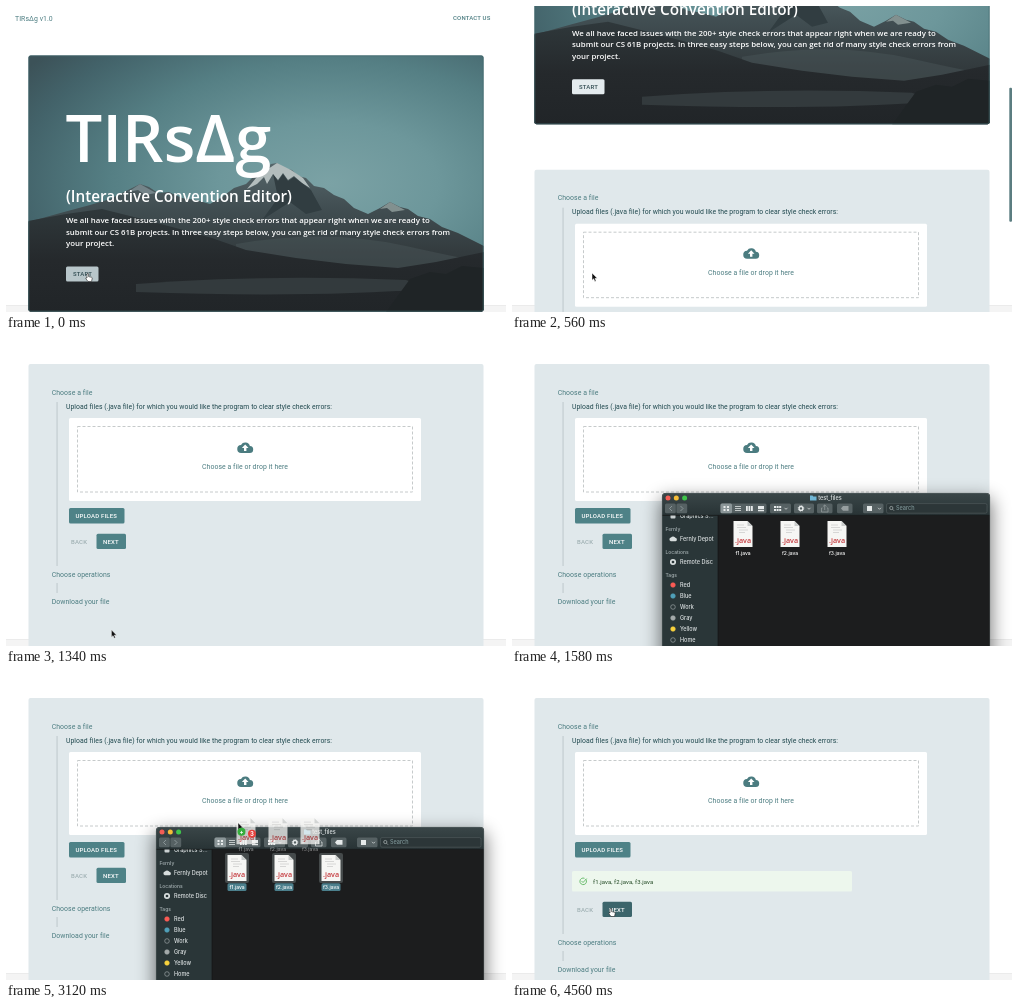
An HTML page for the animation above (4580 ms loop, 500 by 306 pixels).

```html
<!DOCTYPE html>
<html lang="en">
<head>
<meta charset="utf-8">
<title>Convention editor demo</title>
<style>
html, body { margin: 0; width: 100%; height: 100%; overflow: hidden; background: #fff; }
svg { display: block; width: 500px; height: 306px; }
text { font: 400 6.9px Roboto, Arial, sans-serif; letter-spacing: .06px; fill: #4b7c80; white-space: pre; }
.hero text { font-family: "Open Sans", "Noto Sans", sans-serif; font-weight: 600; letter-spacing: 0; fill: #fff; }
.hero .title { font-size: 65px; }
.hero .sub { font-size: 15.3px; }
.hero .body { font-size: 7.87px; }
.hero .btn, .btn { font: 500 6px Roboto, Arial, sans-serif; letter-spacing: .17px; }
.hero .btn { fill: #2f4a50; }
.light { fill: #fff; }
.finder text { font: 500 5.5px Inter, Roboto, sans-serif; letter-spacing: 0; fill: #dfe4e5; }
.finder .head { font-size: 4.9px; font-weight: 600; fill: #98a3a5; }
.finder .label, .ghosts .label { font: 500 5px Inter, sans-serif; letter-spacing: 0; fill: #fff; text-anchor: middle; }
.ext { font: 600 7.2px "Open Sans", sans-serif; letter-spacing: 0; fill: #c4393d; text-anchor: middle; }
.badge { font: 700 6px Inter, sans-serif; fill: #fff; text-anchor: middle; }
</style>
</head>
<body>
<svg viewBox="0 0 500 306">
  <defs>
    <radialGradient id="sky" cx=".66" cy=".5" r=".8">
      <stop offset="0" stop-color="#7ba2a5"/><stop offset=".3" stop-color="#6d979b"/>
      <stop offset=".6" stop-color="#557f84"/><stop offset=".85" stop-color="#43636a"/><stop offset="1" stop-color="#3c5258"/>
    </radialGradient>
    <linearGradient id="far" x1="0" y1="0" x2="0" y2="1">
      <stop offset="0" stop-color="#56666a"/><stop offset=".3" stop-color="#414e52"/>
      <stop offset=".6" stop-color="#333b3e"/><stop offset="1" stop-color="#262c2e"/>
    </linearGradient>
    <linearGradient id="near" x1="0" y1="0" x2="0" y2="1">
      <stop offset="0" stop-color="#2f383b"/><stop offset=".5" stop-color="#25292c"/><stop offset="1" stop-color="#212528"/>
    </linearGradient>
    <linearGradient id="bar" x1="0" y1="0" x2="0" y2="1">
      <stop offset="0" stop-color="#3a4648"/><stop offset="1" stop-color="#283335"/>
    </linearGradient>
    <clipPath id="card"><rect x="22.500" y="49.500" width="455" height="256" rx="2"/></clipPath>
    <clipPath id="side"><rect x="150" y="175.500" width="56" height="131"/></clipPath>
    <filter id="blur" x="-30%" y="-30%" width="160%" height="160%"><feGaussianBlur stdDeviation="9"/></filter>
    <g id="doc">
      <path d="M-9.500 -13H4.500L9.500 -8V13H-9.500Z" fill="#f6f6f4"/>
      <path d="M4.500 -13V-8H9.500Z" fill="#c9cccb"/>
      <path d="M-6 -9H1M-6 -6.500H3M-4 -4H5M-4 -1.500H2" stroke="#cfcfcd" stroke-width=".8"/>
      <text class="ext" y="9">.java</text>
    </g>
  </defs>

  <rect y="299" width="500" height="7" fill="#f4f4f4"/>
  <path d="M0 299.500H500" stroke="#e9e9e9" stroke-width=".7"/>

  <g id="page">
    <text x="9" y="14.500">TIRsΔg v1.0</text>
    <text x="447" y="14.300" class="btn">CONTACT US</text>

    <g class="hero">
      <g clip-path="url(#card)">
        <rect x="22" y="49" width="456" height="257" fill="url(#sky)"/>
        <path d="M22 216L58 206 84 199 104 193 120 185 134 178 143 181 152 187 163 186 176 192 190 194 204 198 216 191 228 182 240 178 250 168 258 164 265 158 271 157 278 162 286 164 292 170 300 172 308 180 318 182 328 189 338 193 348 202 362 208 374 202 384 196 394 201 402 203 412 210 424 213 436 221 452 227 478 240V306H22Z" fill="url(#far)"/>
        <path d="M271 157L262 163 250 172 241 183 251 178 258 171 261 178 267 168 272 174 277 167 282 174 288 170 296 177 304 182 297 172 285 164Z" fill="#b3bdbd"/>
        <path d="M384 196L374 203 381 202 386 206 399 204Z" fill="#82908f"/>
        <path d="M134 178L122 186 132 184 139 189 150 187Z" fill="#748489"/>
        <path d="M267 168L272 192 256 214 284 196 300 208 316 204 305 184 288 171 282 175 277 168 272 175Z" fill="#313d41"/>
        <path d="M230 238Q320 222 400 240T478 254V275H230Z" fill="#4e5b5d" opacity=".4"/>
        <path d="M22 215L60 208 96 203 132 212 170 222 206 232 240 244 290 252 340 258 392 262 430 256 478 246V306H22Z" fill="url(#near)"/>
        <path d="M130 278Q260 268 400 274L424 283Q300 292 130 286Z" fill="#394143" opacity=".75"/>
        <path d="M404 273L424 266 440 268 456 260 478 262V306H380Z" fill="#1f2426"/>
      </g>
      <rect x="22.800" y="49.800" width="454.400" height="255.400" rx="2" fill="none" stroke="#3f666b" stroke-width=".7"/>
      <text class="title" x="59.500" y="156">TIRsΔg</text>
      <text class="sub" x="60" y="196">(Interactive Convention Editor)</text>
      <text class="body" x="60" y="217">We all have faced issues with the 200+ style check errors that appear right when we are ready to</text>
      <text class="body" x="60" y="228.700">submit our CS 61B projects. In three easy steps below, you can get rid of many style check errors from</text>
      <text class="body" x="60" y="240.400">your project.</text>
      <rect id="start" x="60" y="260.500" width="32.500" height="15" rx="1.500"/>
      <text class="btn" x="67" y="270.200">START</text>
    </g>

    <g transform="translate(0 327)">
      <rect x="22.500" y="24" width="455" height="320" rx="2" fill="#e0e8eb"/>
      <text x="45.700" y="54.600">Choose a file</text>
      <rect id="line" x="50.600" y="62" width=".9" fill="#b9c4c7"/>
      <text x="60" y="68.500" style="font-size:6.85px;letter-spacing:.04px;fill:#20494f">Upload files (.java file) for which you would like the program to clear style check errors:</text>
      <rect x="63" y="78" width="352" height="83" rx="1.500" fill="#fff"/>
      <rect x="71.500" y="86.500" width="335" height="65.500" fill="none" stroke="#c6cacb" stroke-dasharray="3 2"/>
      <path d="M235.500 113A4 4 0 0 1 235 105 4.900 4.900 0 0 1 243.900 106 3.500 3.500 0 0 1 243.500 113Z" fill="#4b7c80"/>
      <path d="M239.200 104.500L235.900 108H238V111H240.400V108H242.500Z" fill="#fff"/>
      <text x="196" y="129">Choose a file or drop it here</text>
      <rect x="63" y="168" width="55.500" height="15.500" rx="1.500" fill="#4e8287"/>
      <text class="btn light" x="69.500" y="177.900">UPLOAD FILES</text>
      <g id="alert">
        <rect x="60" y="197" width="280" height="20.500" rx="1.500" fill="#edf7ed"/>
        <path d="M73.800 205.300A3.300 3.300 0 1 1 72.500 204.300M69.500 207L71 208.500 74.700 204.600" fill="none" stroke="#4caf50" stroke-width=".8"/>
        <text x="81" y="209.600" style="font-size:6px;fill:#1e4620">f1.java, f2.java, f3.java</text>
      </g>
      <g id="low">
        <text class="btn" x="65" y="203.700" style="fill:#9eafb2">BACK</text>
        <rect id="next" x="90.500" y="193.700" width="29.500" height="15.300" rx="1.500"/>
        <text class="btn light" x="97" y="203.700">NEXT</text>
        <text x="45.700" y="236.600">Choose operations</text>
        <rect x="50.600" y="243" width=".9" height="10" fill="#b9c4c7"/>
        <text x="45.700" y="264">Download your file</text>
      </g>
    </g>
  </g>
  <rect id="thumb" x="497.300" width="2.700" height="134" rx="1" fill="#5b7d80"/>

  <g id="finder" class="finder">
    <rect x="148" y="158" width="332" height="170" rx="6" fill="#000" opacity=".5" filter="url(#blur)"/>
    <rect x="150" y="153" width="328" height="160" rx="4" fill="#1c1d1e"/>
    <path d="M150 175.500V157Q150 153 154 153H474Q478 153 478 157V175.500Z" fill="url(#bar)"/>
    <rect x="150" y="175.500" width="56" height="135" fill="#2a3638"/>
    <path d="M150 175.300H478M206 175.500V306" stroke="#111" stroke-width=".6"/>
    <path d="M150.200 306V157Q150.200 153.200 154 153.200H474Q477.800 153.200 477.800 157V306" fill="none" stroke="#6d7678" stroke-width=".4"/>
    <circle cx="156" cy="158" r="2.500" fill="#f45d55"/><circle cx="164.300" cy="158" r="2.500" fill="#f5bd37"/><circle cx="172.600" cy="158" r="2.500" fill="#3fc54b"/>
    <path d="M298 155.500H300.500L301.300 156.500H304.500V160.500H298Z" fill="#6fb6d6"/>
    <text x="306.200" y="160">test_files</text>
    <g id="tools" fill="#566163"></g>
    <path d="M160 166L157.500 168.500 160 171M168.500 166L171 168.500 168.500 171" fill="none" stroke="#98a3a5" stroke-width=".8"/>
    <rect x="208.500" y="163.600" width="11.500" height="9.600" rx="1.500" fill="#8b9698"/>
    <g fill="#e6eaea">
      <path d="M211.500 166h2v2h-2zm3.500 0h2v2h-2zm-3.500 3h2v2h-2zm3.500 0h2v2h-2zM223 166h6v.8h-6zm0 2h6v.8h-6zm0 2h6v.8h-6zM234 166h1.800v5H234zm2.500 0h1.800v5h-1.800zm2.500 0h1.800v5H239zM246 166h6v3.300h-6zm0 4h6v1.200h-6z"/>
      <path d="M262 166h2v2h-2zm2.600 0h2v2h-2zm2.600 0h2v2h-2zm-5.200 3h2v2h-2zm2.600 0h2v2h-2zm2.600 0h2v2h-2z"/>
    </g>
    <path d="M272.500 167.800L274 169.300 275.500 167.800M295.500 167.800L297 169.300 298.500 167.800M366 167.800L367.500 169.300 369 167.800" fill="none" stroke="#d3d8d9" stroke-width=".8"/>
    <circle cx="289" cy="168.400" r="1.900" fill="none" stroke="#e6eaea" stroke-width="1.400"/>
    <circle cx="289" cy="168.400" r="2.800" fill="none" stroke="#e6eaea" stroke-width=".8" stroke-dasharray="1.100 1.100"/>
    <g id="active">
      <path d="M310.500 168H309.500V172H316V168H315M312.700 170V165L311 166.500M312.700 165L314.500 166.500" fill="none" stroke="#e6eaea" stroke-width=".7"/>
      <path d="M329 168.400L331 166H336.500V170.800H331Z" fill="#e6eaea"/>
    </g>
    <rect x="355" y="166" width="5" height="5" fill="#e6eaea"/>
    <rect x="374.500" y="163.600" width="100.500" height="9.600" rx="1.500" fill="#2c3638" stroke="#5a6466" stroke-width=".5"/>
    <circle cx="379.300" cy="168" r="1.600" fill="none" stroke="#aeb6b7" stroke-width=".7"/><path d="M380.500 169.200L382 170.700" stroke="#aeb6b7" stroke-width=".7"/>
    <text x="384" y="170.400" style="fill:#7f9799">Search</text>

    <g clip-path="url(#side)">
      <rect x="158.500" y="174" width="5" height="4.500" rx="1" fill="#c9d0d1"/>
      <text x="168" y="178.200">Graphics S...</text>
      <text class="head" x="153.500" y="190.800">Fernly</text>
      <path d="M158.800 201.300A1.900 1.900 0 0 1 159 197.600 2.500 2.500 0 0 1 163.400 197.800 1.800 1.800 0 0 1 163.600 201.300Z" fill="#d7dddd"/>
      <text x="168" y="201">Fernly Depot</text>
      <text class="head" x="153.500" y="213.800">Locations</text>
      <circle cx="161" cy="222" r="2.200" fill="none" stroke="#d7dddd" stroke-width="1.700"/>
      <text x="168" y="224">Remote Disc</text>
      <text class="head" x="153.500" y="237.300">Tags</text>
      <g id="tags"></g>
    </g>
    <g id="files"></g>
    <rect id="band" fill="#fff" fill-opacity=".13" stroke="#b5baba" stroke-width=".5"/>
  </g>

  <g id="ghosts" class="ghosts"></g>
  <g id="cursor">
    <path id="arrow" d="M0 0V7.300L1.700 5.800 2.800 8.400 4.100 7.900 3 5.300H5.300Z" fill="#111" stroke="#fff" stroke-width=".5"/>
    <path id="hand" d="M1 .8Q1.900 0 2.600 .8V3.600L5.600 4.300Q6.400 4.600 6.200 5.600L5.500 8.500H2L-.3 5.400Q-.3 4.400 1 5Z" fill="#fff" stroke="#222" stroke-width=".6"/>
    <g id="badges">
      <circle cx="3.500" cy="9" r="4" fill="#35ad3c"/><text class="badge" x="3.500" y="11.200">+</text>
      <circle cx="14" cy="11" r="4" fill="#e5403c"/><text class="badge" x="14" y="13.200">3</text>
    </g>
  </g>
</svg>
<script>
const LOOP = 4580;
const SCROLL = 327;
const $ = id => document.getElementById(id);
const set = (el, attrs) => { for (const k in attrs) el.setAttribute(k, attrs[k]); };
const show = (el, on) => { el.style.display = on ? '' : 'none'; };
const ramp = (t, a, b) => Math.min(1, Math.max(0, (t - a) / (b - a)));
const ease = p => p * p * (3 - 2 * p);
const smooth = (t, a, b) => ease(ramp(t, a, b));
const mix = (a, b, p) => a + (b - a) * p;
const blend = (a, b, p) => `rgb(${a.map((v, i) => Math.round(mix(v, b[i], p)))})`;

// Toolbar buttons: x, width
$('tools').innerHTML = [[153, 10.8], [164.4, 10.8], [208.5, 46], [258, 21], [282, 20], [305, 15.5], [325, 15.5], [351, 20.5]]
  .map(([x, w]) => `<rect x="${x}" y="163.600" width="${w}" height="9.600" rx="1.500"/>`).join('');

$('tags').innerHTML = [['Red', '#fb5b55'], ['Blue', '#4f9fb8'], ['Work'], ['Gray', '#a3a9aa'], ['Yellow', '#f7d13d'], ['Home']]
  .map(([name, fill], i) => {
    const y = 245 + i * 11;
    return `<circle cx="161" cy="${y}" r="2.300" fill="${fill || 'none'}" stroke="${fill || '#aab3b4'}" stroke-width=".6"/>` +
      `<text x="168" y="${y + 2}">${name}</text>`;
  }).join('');

const fileX = [231, 278, 325];
$('files').innerHTML = fileX.map((x, i) => `<g transform="translate(${x} 194)">
  <g class="pick"><rect x="-12" y="-15" width="24" height="30" rx="2" fill="#454a4b"/>
  <rect x="-9.500" y="15.300" width="19" height="7.800" rx="1.500" fill="#4b7f8c"/></g>
  <use href="#doc"/><text class="label" y="21.200">f${i + 1}.java</text></g>`).join('');
$('ghosts').innerHTML = fileX.map((x, i) => `<g opacity=".75"><use href="#doc"/>
  <text class="label" y="20" opacity=".6">f${i + 1}.java</text></g>`).join('');
const picks = [...document.querySelectorAll('.pick')];
const ghosts = [...$('ghosts').children];

// Pointer stops: time, x, y
const path = [
  [0, 80, 267], [1240, 80, 267], [1440, 130, 312], [1640, 300, 312],
  [2190, 376, 203], [2320, 376, 203], [2720, 216, 181], [2880, 223, 186],
  [3380, 242, 107], [3600, 242, 107], [3820, 256, 110], [4200, 256, 110], [4550, 97, 234]
];

function pointer(t) {
  const i = path.findIndex(p => p[0] > t);
  if (i < 0) return path[path.length - 1].slice(1);
  const a = path[i - 1], b = path[i], p = smooth(t, a[0], b[0]);
  return [mix(a[1], b[1], p), mix(a[2], b[2], p)];
}

function draw(t) {
  const [x, y] = pointer(t);
  const top = SCROLL * smooth(t, 240, 825);
  set($('page'), { transform: `translate(0 ${-top})` });
  set($('thumb'), { y: top * 0.437, opacity: t < 240 ? 0 : 1 - 0.8 * ramp(t, 960, 1100) });
  show($('thumb'), t < 1100);
  set($('start'), { fill: blend([184, 198, 202], [228, 235, 238], ramp(t, 60, 300)) });

  const done = t >= 3600;
  show($('alert'), done);
  set($('low'), { transform: `translate(0 ${done ? 34 : 0})` });
  set($('line'), { height: done ? 198 : 164 });
  set($('next'), { fill: blend([78, 130, 135], [60, 101, 107], ramp(t, 4460, 4550)) });

  const open = ramp(t, 1420, 1500) * (1 - ramp(t, 3640, 3800));
  show($('finder'), open > 0);
  set($('finder'), { opacity: open });
  const picking = t >= 2320 && t < 2740;
  show($('band'), picking);
  if (picking) set($('band'), { x, y, width: Math.max(0, 376 - x), height: Math.max(0, 203 - y) });
  picks.forEach((el, i) => show(el, t >= 2720 || (t >= 2320 && x < fileX[i] + 10)));
  set($('active'), { opacity: t >= 2500 ? 1 : 0.45 });

  const drag = t >= 2880 && t < 3600;
  show($('ghosts'), drag);
  show($('badges'), t >= 3000 && t < 3600);
  const gap = mix(47, 32, smooth(t, 2880, 3090));
  ghosts.forEach((el, i) => set(el, { transform: `translate(${x + 8 + i * gap} ${y + 8.5})` }));

  const hand = t < 300 || t >= 4480;
  set($('cursor'), { transform: `translate(${x} ${y})` });
  show($('hand'), hand);
  show($('arrow'), !hand);
}

const begin = performance.now();
function frame() {
  draw((performance.now() - begin) % LOOP);
  requestAnimationFrame(frame);
}
frame();
</script>
</body>
</html>
```
